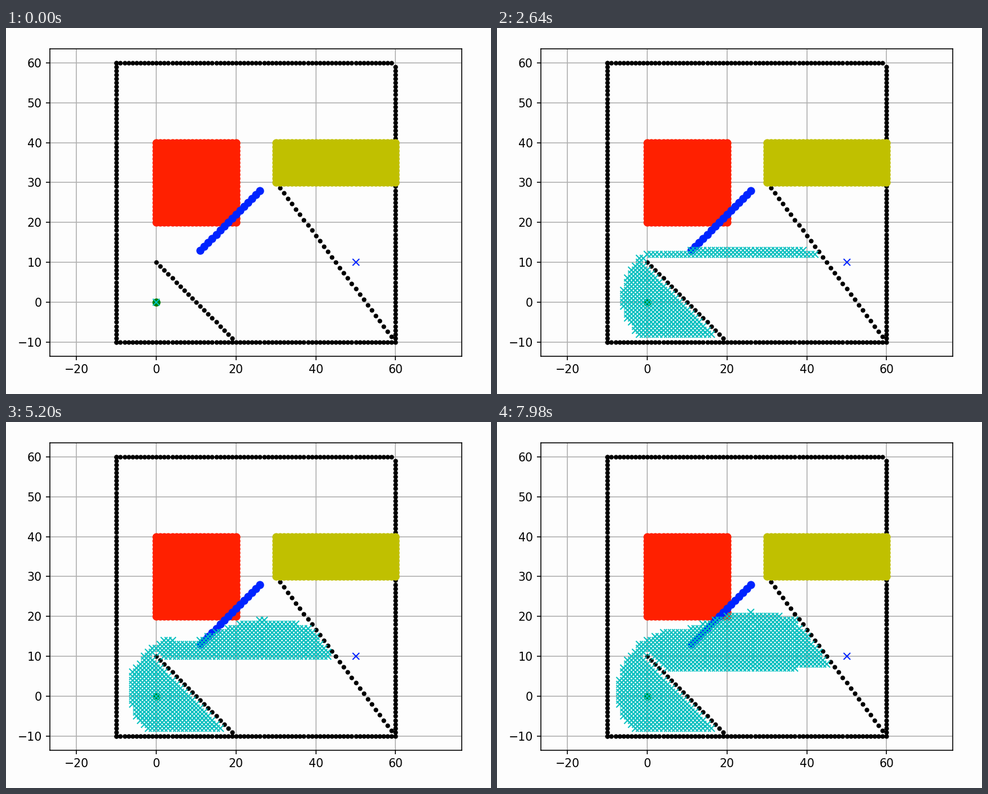
Animation, 862 px wide and 650 px high, one loop 8 s. Source, as a matplotlib script:

```python
import math

import matplotlib.pyplot as plt
import numpy as np
from matplotlib.animation import FuncAnimation
from matplotlib.lines import Line2D

W, H, DPI = 862, 650, 128
UNIT = 7.087                 # pixels per grid cell
X0, Y0 = 267.2, 487.0        # pixel position of the grid origin
PT = 147.62 / DPI            # scale for point sizes
START, GOAL = (0, 0), (50, 10)
JET_SAVING = 0.191
BATCH = 10                   # cells searched per redraw
RED, BLUE, YELLOW, CYAN, BACK = "#ff2000", "#0024ff", "#c0c000", "#00bfbf", "#fdfdfd"

# ---- the map ----
walls = [(x, -10) for x in range(-10, 60)]
walls += [(60, y) for y in range(-10, 60)]
walls += [(x, 60) for x in range(-10, 60)]
walls += [(-10, y) for y in range(-10, 61)]
walls += [(x, 10 - x) for x in range(20)]
walls += [(x, 30 - 4 * (x - 30) / 3) for x in range(30, 60)]
jet = [(11 + i, 13 + i) for i in range(16)]


def block(x0, x1, y0, y1):
    return [(x, y) for x in range(x0, x1 + 1) for y in range(y0, y1 + 1)]


# ---- A* search, keeping the order in which cells are closed ----
wall_xy = np.array(walls, float)


def is_blocked(x, y):
    gap = np.hypot(wall_xy[:, 0] - x, wall_xy[:, 1] - y)
    return gap.min() <= 1 + 1e-9


def search(limit):
    blocked = {(x, y) for x, y in block(-10, 60, -10, 60) if is_blocked(x, y)}
    moves = [(dx, dy) for dx in (-1, 0, 1) for dy in (-1, 0, 1) if dx or dy]
    costs, closed, order = {START: 0.0}, set(), []

    def rank(cell):
        to_goal = math.hypot(GOAL[0] - cell[0], GOAL[1] - cell[1])
        # equal estimates settle outward from the far end of the corridor
        return round(costs[cell] + to_goal, 9), abs(cell[0] - 36.5)

    while costs and len(order) < limit:
        cell = min(costs, key=rank)
        cost = costs.pop(cell)
        closed.add(cell)
        order.append(cell)
        for dx, dy in moves:
            x, y = cell[0] + dx, cell[1] + dy
            if (x, y) in blocked or (x, y) in closed:
                continue
            step = math.hypot(dx, dy)
            if 11 <= x <= 26 and 13 <= y <= 28:
                step *= 1 - JET_SAVING
            if cost + step < costs.get((x, y), math.inf):
                costs[x, y] = cost + step
    return np.array(order)


# ---- pacing: two short ticks and one long tick every 140 ms ----
TICKS = [0, 25, 56, 92, 112, 146, 171]
REDRAWS = [0, 18, 31, 49, 54, 67, 76]


def cells_shown(frame):
    group, rest = divmod(frame + 1, 7)
    tick = 3 * group + min(rest, 2) - 1
    return BATCH * int(np.interp(tick, TICKS, REDRAWS) + 0.5) + 1


cells = search(BATCH * REDRAWS[-1] + 1)

# ---- the plot ----
plt.rcParams.update({
    "font.family": "DejaVu Sans",
    "font.size": 10 * PT,
    "lines.markersize": 6 * PT,
    "lines.markeredgewidth": PT,
    "axes.linewidth": 0.8 * PT,
    "grid.linewidth": 0.8 * PT,
    "toolbar": "None",
})
for axis in ("xtick", "ytick"):
    plt.rcParams[axis + ".major.size"] = 3.5 * PT
    plt.rcParams[axis + ".major.width"] = 0.8 * PT
    plt.rcParams[axis + ".major.pad"] = 3.5 * PT

fig = plt.figure(figsize=(W / DPI, H / DPI), dpi=DPI, facecolor=BACK)
xlim, ylim = (-26.66, 76.66), (-13.5, 63.5)
ax = fig.add_axes([
    (X0 + xlim[0] * UNIT) / W,
    (H - Y0 + ylim[0] * UNIT) / H,
    (xlim[1] - xlim[0]) * UNIT / W,
    (ylim[1] - ylim[0]) * UNIT / H,
], facecolor=BACK)
ax.set(xlim=xlim, ylim=ylim,
       xticks=range(-20, 61, 20), yticks=range(-10, 61, 10))
ax.grid(True, color="#b0b0b0")


def dots(points, marker, color):
    xs, ys = zip(*points)
    return ax.plot(xs, ys, marker, color=color, linestyle="none")[0]


dots(walls, ".", "black")
dots([START], "o", "#008000")
dots([GOAL], "x", BLUE)
dots(block(30, 60, 30, 40), "o", YELLOW)
dots(block(0, 20, 20, 40), "o", RED)
dots(jet, "o", BLUE)
visited = dots([START], "x", CYAN)

# thin window edge along the bottom
fig.add_artist(Line2D([0, 1], [0.5 / H] * 2, color="#8c8c8c",
                      linewidth=72 / DPI, antialiased=False))


def update(frame):
    shown = cells[:cells_shown(frame)]
    visited.set_data(shown[:, 0], shown[:, 1])
    return [visited]


anim = FuncAnimation(fig, update, frames=400, interval=20,
                     init_func=lambda: update(0), repeat=True,
                     repeat_delay=0, blit=False)
plt.show()
```
